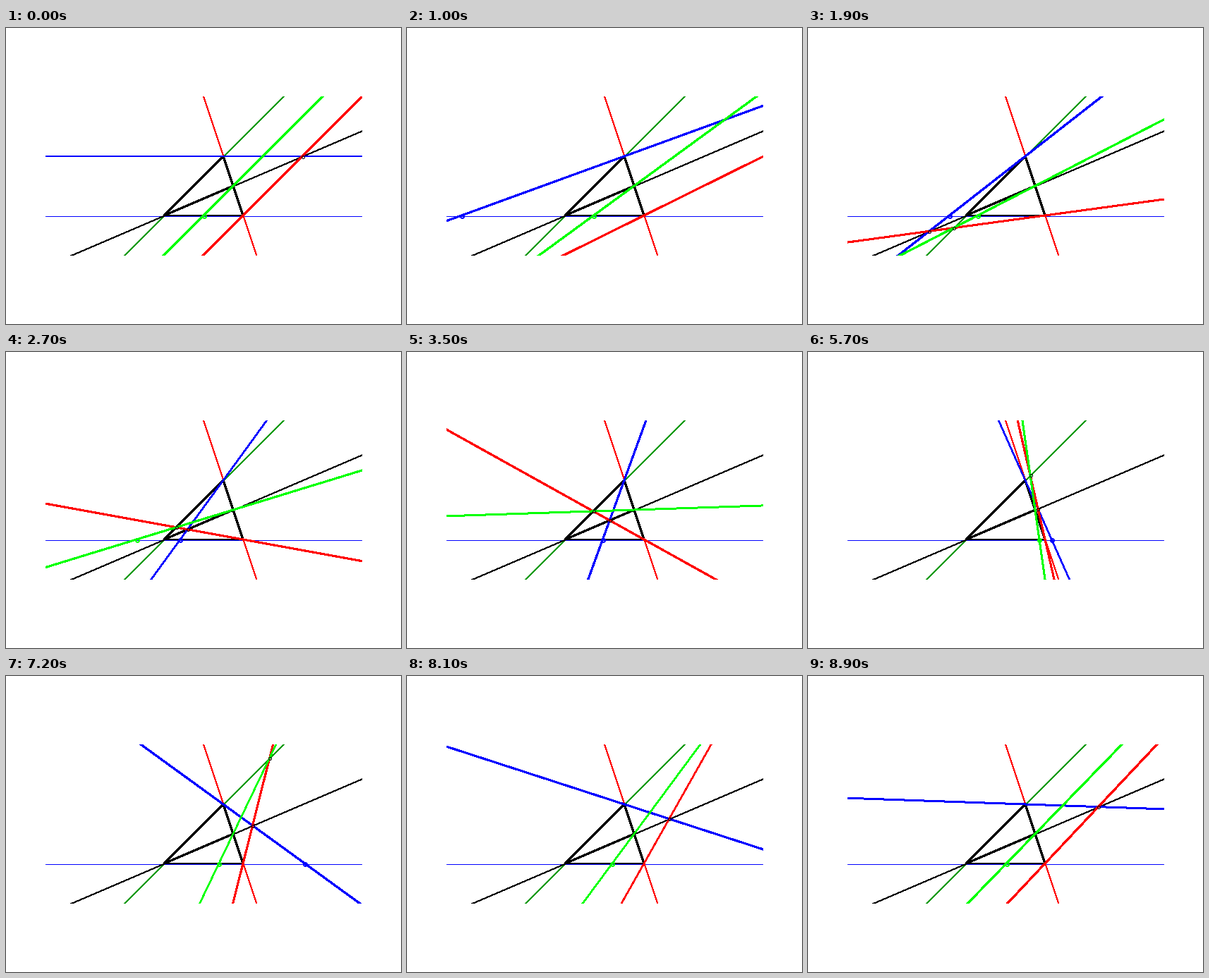
A matplotlib script that plays this animation: 560 by 420 pixels, repeating every 9 s.

```python
import numpy as np
import matplotlib.pyplot as plt
from matplotlib.animation import FuncAnimation
from matplotlib.patches import Rectangle
from matplotlib.transforms import Affine2D

W, H, DPI = 560, 420, 70
UNIT = 28                   # pixels per unit
OX, OY = 224.5, 266.5       # pixel position of the origin
PX = 72 / DPI               # one pixel in points
FRAMES = 90

BLACK, RED, GREEN, BLUE = "#000000", "#ff0000", "#00ff00", "#0000ff"
DARK_GREEN = "#009900"

fig = plt.figure(figsize=(W / DPI, H / DPI), dpi=DPI, facecolor="white")
ax = fig.add_axes([0, 0, 1, 1])
ax.set_xlim(-OX / UNIT, (W - OX) / UNIT)
ax.set_ylim((OY - H) / UNIT, OY / UNIT)
ax.axis("off")

view = Rectangle(((56 - OX) / UNIT, (OY - 323) / UNIT), 449 / UNIT, 226 / UNIT,
                 transform=ax.transData)
half_px = ax.transData + Affine2D().translate(-0.5, 0.5)


# Points and lines are homogeneous triples, so parallels need no special case.
def point(x, y):
    return np.array([x, y, 1.0])


def join(p, q):
    return np.cross(p, q)


meet = join


def ends(line, reach=40):
    a, b, c = line
    n = a * a + b * b
    foot = np.array([-a * c, -b * c]) / n
    step = np.array([b, -a]) / np.sqrt(n) * reach
    return np.transpose([foot - step, foot + step])


def place(p):
    if abs(p[2]) < 1e-9:
        return [np.nan], [np.nan]
    return [p[0] / p[2]], [p[1] / p[2]]


def stroke(color, width, xs=(), ys=()):
    shift = half_px if width > 1 else ax.transData
    art, = ax.plot(xs, ys, color=color, lw=width * PX, aa=False,
                   solid_capstyle="butt", transform=shift)
    art.set_clip_path(view)
    return art


def ring(color, size, width):
    art, = ax.plot([], [], "o", mfc="none", mec=color, ms=size * PX,
                   mew=width * PX, aa=False)
    art.set_clip_path(view)
    return art


def set_line(art, line):
    art.set_data(*ends(line))
    a, b = np.abs(line[:2])
    art.set_linewidth((1.4 if 1.2 * b < a < 2.6 * b else 2) * PX)


A, B, C, M = point(0, 0), point(4, 0), point(3, 3), point(3.5, 1.5)
base, side, far, median = join(A, B), join(A, C), join(B, C), join(A, M)

for line, color in ((base, BLUE), (side, DARK_GREEN), (far, RED), (median, BLACK)):
    stroke(color, 1, *ends(line))
for p, q in ((A, B), (B, C), (C, A), (A, M)):
    stroke(BLACK, 2, [p[0], q[0]], [p[1], q[1]])

blue, red, green = (stroke(c, 2) for c in (BLUE, RED, GREEN))
blue_dot, green_dot = ring(BLUE, 5, 2), ring(GREEN, 5, 2)
p_dot, q_dot = ring(BLACK, 4, 1), ring(BLACK, 4, 1)


def update(i):
    t = np.pi * i / FRAMES
    from_c = join(C, np.array([np.cos(t), np.sin(t), 0.0]))
    P = meet(from_c, median)
    from_b = join(B, P)
    Q = meet(from_b, side)
    from_m = join(M, Q)

    for art, line in ((blue, from_c), (red, from_b), (green, from_m)):
        set_line(art, line)
    blue_dot.set_data(*place(meet(from_c, base)))
    green_dot.set_data(*place(meet(from_m, base)))
    p_dot.set_data(*place(P))
    q_dot.set_data(*place(Q))
    return blue, red, green, blue_dot, green_dot, p_dot, q_dot


anim = FuncAnimation(fig, update, frames=FRAMES, interval=100, repeat=True,
                     repeat_delay=0, blit=False)
plt.show()
```
